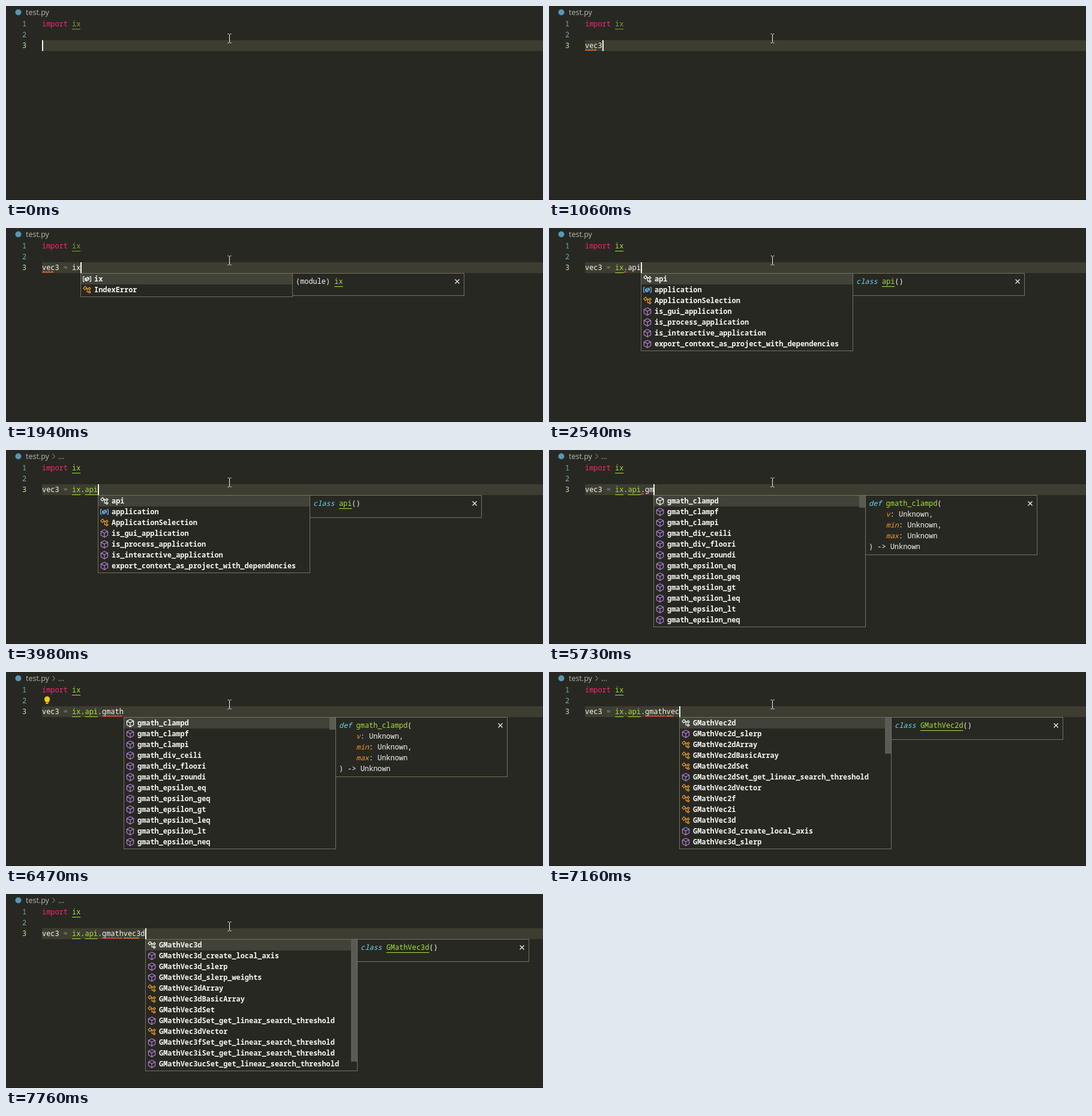
An HTML page for the animation above (8 s loop, 895 by 323 pixels).

```html
<!DOCTYPE html>
<html lang="en">
<head>
<meta charset="utf-8">
<title>Code completion</title>
<style>
html, body { margin: 0; width: 100%; height: 100%; overflow: hidden; background: #272822; }
svg { display: block; width: 895px; height: 323px; }
text { font: 500 11.91px "Noto Sans Mono", "DejaVu Sans Mono", monospace; fill: #f8f8f2; white-space: pre; }
.ui { font: 12.5px "Open Sans", "Noto Sans", sans-serif; fill: #b9bab4; }
.list { font-weight: 600; }
.kw { fill: #f92672; }
.op { fill: #858472; }
.def { fill: #66d9ef; font-style: italic; }
.arg { fill: #fd971f; font-style: italic; }
.name, .link { fill: #a6e22e; }
.num { fill: #7fa9a8; }
.now { fill: #d5d8a8; }
</style>
</head>
<body>
<svg id="stage" viewBox="0 0 895 323"></svg>
<script>
const CH = 7.147, LEFT = 60, LOOP = 8000;
const CODE = 'vec3 = ix.api.gmathvec3d';
const RED = '#f0463c', ORANGE = '#e8722c', GREEN = '#a6e22e';
const colX = n => LEFT + n * CH;

const rect = (x, y, w, h, fill, more = '') =>
  `<rect x="${x}" y="${y}" width="${w}" height="${h}" fill="${fill}" ${more}/>`;
const path = (d, stroke, more = '') =>
  `<path d="${d}" fill="none" stroke="${stroke}" ${more}/>`;
const label = (x, y, str, cls = '') => `<text x="${x}" y="${y}" class="${cls}">${str}</text>`;

// Text with {class|words} marks; links get an underline.
function rich(x, y, str, linkColor = GREEN) {
  let col = 0, spans = '', lines = '';
  for (const [, cls, marked, plain] of str.matchAll(/\{(\w+)\|(.*?)\}|([^{]+)/g)) {
    const words = marked || plain;
    spans += `<tspan class="${cls || ''}">${words}</tspan>`;
    if (cls === 'link') lines += rect(x + col * CH, y + 4, words.length * CH, 1, linkColor);
    col += words.length;
  }
  return label(x, y, spans) + lines;
}

function squiggle(from, to, color) {
  const x0 = colX(from), x1 = colX(to);
  let d = `M${x0} 74.3`;
  for (let i = 1; x0 + i * 2.4 <= x1; i++) d += `L${x0 + i * 2.4} ${i % 2 ? 72.3 : 74.3}`;
  return path(d, color, 'stroke-width="1.1"');
}

// Icons sit in a 14 px box. m: method, c: class, v: variable, k: keyword.
const icons = {
  m: ['#b180d7', 'M7 .8L12.6 3.6V10L7 13.2L1.4 10V3.6ZM1.6 3.7L7 6.6L12.4 3.7M7 6.6V13'],
  c: ['#ee9d28', 'M1 4.2L4 1.2L6.6 3.8L3.6 6.8ZM5.6 4.8H9M7.2 4.8V10.5H9M9 4.8L11 2.8L13 4.8L11 6.8ZM9 10.5L11 8.5L13 10.5L11 12.5Z'],
  v: ['#75beff', 'M3 3H.7V11H3M11 3H13.3V11H11M3.6 6.4L8 4L10.4 5.4V8L6 10.4L3.6 9ZM3.6 6.4L6 7.8L10.4 5.4M6 7.8V10'],
  k: ['#c5c5c5', 'M1 2H13V12H1ZM3 5H9M3 8H11']
};

const clampDoc = ['{def|def} {name|gmath_clampd}(', '    {arg|v}: Unknown,', '    {arg|min}: Unknown,', '    {arg|max}: Unknown', ') -> Unknown'];
const classDoc = name => [`{def|class} {link|${name}}()`];
const words = (...groups) => groups.flatMap(g => g.split(' ').map(w => w.split(':')));
const apiRows = words('c:api v:application c:ApplicationSelection m:is_gui_application m:is_process_application m:is_interactive_application m:export_context_as_project_with_dependencies');
const search = '_get_linear_search_threshold';

const popups = {
  v: {
    rows: words('m:vars c:ValueError c:EnvironmentError c:OverflowError'), tall: 250,
    doc: ['{def|def} {name|vars}(', '    {arg|__object}: Any = ...', ') -> dict[str, Any]', '',
      'vars([object]) -> dictionary', '', 'Without arguments, equivalent to', 'locals(). With an argument,', 'equivalent to object.__dict__.']
  },
  ve: {
    rows: words('c:ValueError c:EnvironmentError c:OverflowError'), tall: 85,
    doc: ['{def|class} {link|ValueError}(', '    {arg|*args}: object', ')', 'Inappropriate argument value.']
  },
  i: { rows: words('k:if k:import k:in k:is m:id m:input c:int m:isinstance m:issubclass m:iter v:ix c:ImportError'), doc: ['{def|if}'] },
  ix: { rows: words('v:ix c:IndexError'), doc: ['(module) {link|ix}'] },
  'ix.': {
    rows: words('m:add_item c:api v:application c:ApplicationSelection m:begin_command_batch m:close_project m:create_context m:create_object m:delete_item m:enable_command_history m:end_command_batch m:export_context_as_project'),
    doc: ['{def|def} {name|add_item}(', '    {arg|item}: Unknown', ') -> None'], bar: 60
  },
  api: { rows: apiRows, doc: classDoc('api') },
  'api.': {
    rows: words('c:AppBase c:AppObject c:AppProgress c:AppSelection c:AppVersion c:Attr c:AttrArray c:AttrEvent c:BaseArray c:BaseObject c:BitMask c:ClassInfo'),
    doc: classDoc('AppBase'), bar: 20
  },
  gmath: {
    rows: words(...['clampd', 'clampf', 'clampi', 'div_ceili', 'div_floori', 'div_roundi', 'epsilon_eq', 'epsilon_geq',
      'epsilon_gt', 'epsilon_leq', 'epsilon_lt', 'epsilon_neq'].map(n => 'm:gmath_' + n)),
    doc: clampDoc, bar: 20
  },
  vec: {
    rows: words(...['c:2d', 'm:2d_slerp', 'c:2dArray', 'c:2dBasicArray', 'c:2dSet', 'm:2dSet' + search, 'c:2dVector',
      'c:2f', 'c:2i', 'c:3d', 'm:3d_create_local_axis', 'm:3d_slerp'].map(n => n.replace(':', ':GMathVec'))),
    doc: classDoc('GMathVec2d'), bar: 60
  },
  vec3: {
    rows: words(...['c:d', 'm:d_create_local_axis', 'm:d_slerp', 'm:d_slerp_weights', 'c:dArray', 'c:dBasicArray', 'c:dSet',
      'm:dSet' + search, 'c:dVector', 'm:fSet' + search, 'm:iSet' + search, 'm:ucSet' + search].map(n => n.replace(':', ':GMathVec3'))),
    doc: classDoc('GMathVec3d'), bar: 203
  }
};

function popup(key, n) {
  const { rows, doc, bar, tall } = popups[key];
  const x = Math.round(colX(n)), docX = x + 353;
  const box = (bx, w, h) => rect(bx + .5, 75.5, w - 1, h - 1, '#272822', 'stroke="#75715e"');
  let out = box(x, 354, rows.length * 18 + 4) + rect(x + 1, 76, 352, 18, '#414339');
  rows.forEach(([kind, name], i) => {
    const [color, d] = icons[kind];
    out += `<g transform="translate(${x + 4} ${78 + i * 18})">${path(d, i ? color : '#fff', 'stroke-width="1.2"')}</g>`;
    out += label(x + 23, 89 + i * 18, name, 'list');
  });
  if (bar) out += rect(x + 343, 76, 10, bar, '#5a5b55');
  out += box(docX, 287, tall || (doc.length > 1 ? doc.length * 18 + 10 : 38));
  doc.forEach((line, i) => { if (line) out += rich(docX + 6, 93 + i * 18, line); });
  const cx = x + 628;
  return out + path(`M${cx - 3.5} 85.5l7 7m0 -7l-7 7`, '#f0f0ea', 'stroke-width="1.4"');
}

const bulb = '<path d="M66.3 50.2C62.6 47.6 63.4 40.6 68.5 40.6S74.4 47.6 70.7 50.2Z" fill="#fc0"/>' +
  rect(66.5, 50.5, 4, 2.6, '#fc0') + rect(66.5, 50.3, 4, .8, '#6b5b12');

// [ms, what changes]
const steps = [
  [0, { n: 0, pop: '', caret: 1, bulb: 0, wave: [], ix: 0, api: 0, crumb: 0 }],
  [330, { n: 1 }], [400, { pop: 'v' }], [470, { n: 2, pop: 've' }], [610, { n: 3, pop: '' }],
  [860, { bulb: 1, wave: [[0, 3, ORANGE]] }], [1060, { n: 4, bulb: 0 }],
  [1330, { n: 5 }], [1400, { n: 6 }], [1530, { n: 7 }],
  [1800, { n: 8 }], [1870, { pop: 'i' }], [1930, { n: 9, pop: 'ix' }],
  [2070, { n: 10, pop: '' }], [2140, { pop: 'ix.' }],
  [2340, { n: 11, pop: 'api', ix: 1, wave: [[9, 10, RED]] }], [2470, { n: 12 }], [2540, { n: 13 }],
  [2800, { api: 1, wave: [] }], [3060, { crumb: 1 }],
  [3520, { caret: 0 }], [3980, { caret: 1 }], [4520, { caret: 0 }],
  [4980, { n: 14, pop: '', caret: 1 }], [5120, { pop: 'api.' }], [5260, { wave: [[13, 14, RED]] }],
  [5460, { n: 15, pop: 'gmath' }], [5730, { n: 16 }], [5800, { n: 17 }], [5930, { n: 18 }], [6000, { n: 19 }],
  [6270, { bulb: 1, wave: [[14, 19, RED]] }], [6470, { caret: 0 }],
  [6750, { n: 20, pop: 'vec', caret: 1, bulb: 0 }], [6820, { n: 21 }],
  [7090, { bulb: 1, wave: [[14, 19, RED], [19, 21, ORANGE]] }], [7160, { n: 22, bulb: 0 }],
  [7430, { bulb: 1, wave: [[14, 19, RED], [19, 22, ORANGE]] }], [7500, { n: 23, pop: 'vec3', bulb: 0 }],
  [7760, { n: 24, wave: [[14, 19, RED], [19, 23, ORANGE]] }]
];

const mouse = 'M369.5 46.5H371.5M373.5 46.5H375.5M372.5 47V61M369.5 61.5H371.5M373.5 61.5H375.5';

function scene(s) {
  const typed = CODE.slice(0, s.n).replace('=', '{op|=}')
    .replace('ix', s.ix ? '{link|ix}' : 'ix').replace('api', s.api ? '{link|api}' : 'api');
  let out = rect(0, 322, 895, 1, '#1b1c18') + rect(LEFT, 57, 835, 18, '#3e3d32');
  out += '<circle cx="20.5" cy="10.5" r="5" fill="#519aba"/>' + label(33, 15, 'test.py', 'ui');
  if (s.crumb) out += path('M77.5 6.5l4 4l-4 4', '#a9aaa4') + label(87, 15, '...', 'ui');
  [1, 2, 3].forEach(i => { out += label(27, 16 + i * 18, i, i < 3 ? 'num' : 'now'); });
  out += rich(LEFT, 34, '{kw|import} ');
  out += `<g opacity="${s.ix ? 1 : .67}">${rich(colX(7), 34, '{link|ix}')}</g>`;
  out += rich(LEFT, 70, typed);
  for (const w of s.wave) out += squiggle(...w);
  if (s.caret) out += rect(Math.round(colX(s.n)), 57, 2, 18, '#f8f8f0');
  if (s.bulb) out += bulb;
  if (s.pop) out += popup(s.pop, s.n);
  return out + path(mouse, '#f4f4f4');
}

const stage = document.getElementById('stage');
const start = performance.now();
let shown = -1;
function tick() {
  const t = (performance.now() - start) % LOOP;
  const last = steps.findLastIndex(([at]) => at <= t);
  if (last !== shown) {
    shown = last;
    stage.innerHTML = scene(Object.assign({}, ...steps.slice(0, last + 1).map(step => step[1])));
  }
  requestAnimationFrame(tick);
}
tick();
</script>
</body>
</html>
```
